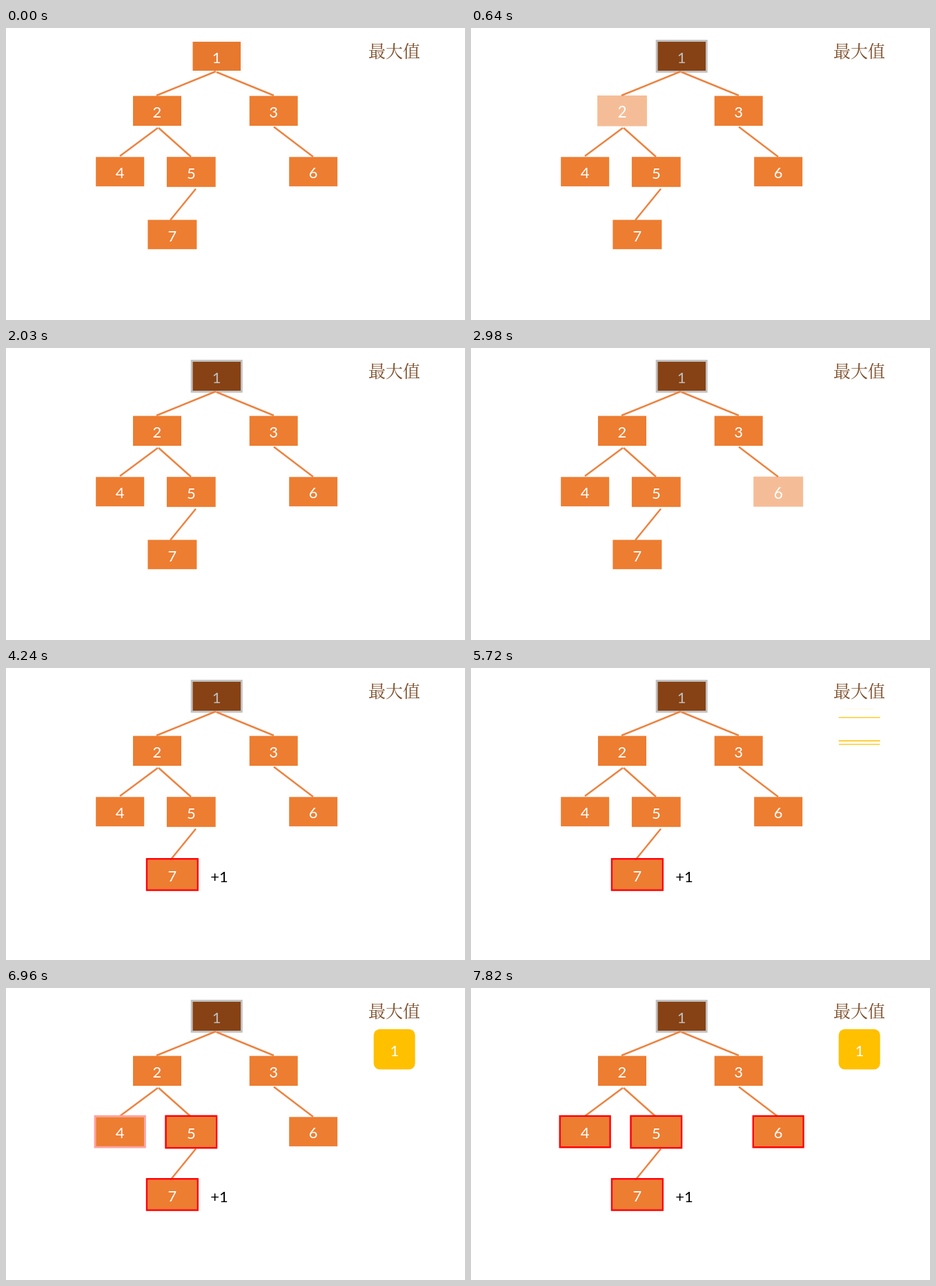
These frames come from a looping animation (665 by 424 pixels, 8000 ms). An HTML page:

```html
<!DOCTYPE html>
<html lang="zh-CN">
<head>
<meta charset="utf-8">
<title>Tree traversal</title>
<style>
  html, body { margin: 0; width: 100%; height: 100%; overflow: hidden; background: #fff; }
  svg { display: block; width: 100vw; height: 100vh; }
  .digit { font: 22px Lato, "Open Sans", sans-serif; text-anchor: middle; fill: #fff; }
  .title { font: 300 25px "Noto Serif CJK SC", "Noto Serif SC", "Noto Sans CJK SC", "Noto Sans CJK", serif; fill: #7f4f2c; }
  .link { stroke: #ed8340; stroke-width: 2.5; fill: none; }
</style>
</head>
<body>
<svg id="stage" viewBox="0 0 665 424"></svg>
<script>
const LOOP = 8000;
const TICK = 78.2;
const BORDER = 2.6;
const WHITE = [255, 255, 255];
const ORANGE = [237, 125, 49];
const BROWN = [134, 66, 20];
const GRAY = [191, 191, 191];
const RED = [255, 0, 0];

// cx, cy, width, height, then start times of the effects
const nodes = [
  { label: 1, box: [305.2, 41, 69.8, 42.4], darken: -30 },
  { label: 2, box: [219, 120.3, 70, 43.4], pulse: 490 },
  { label: 3, box: [387.7, 120.3, 70, 43.4], pulse: 990 },
  { label: 4, box: [165.2, 208.6, 70, 42.6], pulse: 1525, mark: 6775 },
  { label: 5, box: [268.3, 209, 70.8, 43.6], pulse: 2060, mark: 6250 },
  { label: 6, box: [445.2, 208.6, 70, 42.6], pulse: 2610, mark: 7300 },
  { label: 7, box: [240.9, 299.9, 71, 42.6], mark: 3160 }
];

const svg = document.getElementById("stage");

function add(parent, tag, attrs, text) {
  const el = document.createElementNS("http://www.w3.org/2000/svg", tag);
  set(el, attrs);
  if (text !== undefined) el.textContent = text;
  parent.appendChild(el);
  return el;
}

function set(el, attrs) {
  for (const key in attrs) el.setAttribute(key, attrs[key]);
}

const progress = (t, start, length = 500) => Math.min(1, Math.max(0, (t - start) / length));
const mix = (a, b, p) => `rgb(${a.map((v, i) => Math.round(v + (b[i] - v) * p))})`;
const show = (el, on) => set(el, { visibility: on ? "visible" : "hidden" });

add(svg, "rect", { width: 665, height: 424, fill: "#fff" });
add(svg, "path", { class: "link", d: "M220 145L165 186M221 145L268 187M388 143.5L445 187M275 233.5L238 279" });

for (const node of nodes) {
  const [cx, cy, w, h] = node.box;
  node.group = add(svg, "g", {});
  node.fill = add(node.group, "rect", { x: cx - w / 2, y: cy - h / 2, width: w, height: h, fill: mix(ORANGE, ORANGE, 0) });
  node.edge = add(node.group, "rect", {
    x: cx - (w + BORDER) / 2, y: cy - (h + BORDER) / 2,
    width: w + BORDER, height: h + BORDER, fill: "none", "stroke-width": BORDER
  });
  node.text = add(node.group, "text", { class: "digit", x: cx, y: cy + 9.7 }, node.label);
}

add(svg, "path", { class: "link", d: "M304 63L218 98M305 64L388 98" });
add(svg, "text", { class: "title", x: 525, y: 43 }, "最大值");
const plusOne = add(svg, "text", { class: "digit", x: 309, y: 311, style: "fill:#000" }, "+1");

const best = add(svg, "g", {});
add(best, "rect", { x: 532.7, y: 59.7, width: 60, height: 58.6, rx: 9, fill: "#ffc000" });
add(best, "text", { class: "digit", x: 562.8, y: 98.5 }, 1);
const bars = add(best, "path", { fill: "#fff" });

// Each thin row appears at its own random moment; one row comes last.
const ROWS = 46, ROW = 1.3, LAST_ROW = 15;
const rowTimes = Array.from({ length: ROWS }, (_, i) => {
  const n = Math.sin((i + 1) * 127.1) * 43758.5453;
  return i === LAST_ROW ? 0.985 : (n - Math.floor(n)) * 0.94;
});

// Fades to half and back while swelling by 5 %.
function pulse(node, t) {
  const p = progress(t, node.pulse);
  const dip = Math.min(1, p / 0.2, (1 - p) / 0.2);
  const scale = 1 + 0.05 * (1 - Math.abs(2 * p - 1));
  const [cx, cy] = node.box;
  set(node.group, {
    opacity: 1 - dip * 0.5,
    transform: `translate(${cx} ${cy}) scale(${scale}) translate(${-cx} ${-cy})`
  });
}

function drawBorder(node, color, p) {
  set(node.edge, { stroke: p > 0 ? mix(WHITE, color, p) : "none" });
}

function draw(time) {
  const t = Math.floor((time + 15) / TICK) * TICK;
  for (const node of nodes) {
    if (node.pulse) pulse(node, t);
    if (node.mark) drawBorder(node, RED, progress(t, node.mark));
    if (node.darken) {
      const p = progress(t, node.darken);
      set(node.fill, { fill: mix(ORANGE, BROWN, p) });
      node.text.style.fill = mix(WHITE, GRAY, p);
      drawBorder(node, GRAY, p);
    }
  }
  show(plusOne, time >= 4235);

  const p = progress(t, 5690);
  show(best, p > 0);
  let d = "";
  rowTimes.forEach((at, i) => {
    if (at > p) d += `M531 ${59.6 + i * ROW}h64v${ROW}h-64z`;
  });
  set(bars, { d });
}

const start = performance.now();
function frame() {
  draw((performance.now() - start) % LOOP);
  requestAnimationFrame(frame);
}
frame();
</script>
</body>
</html>
```
